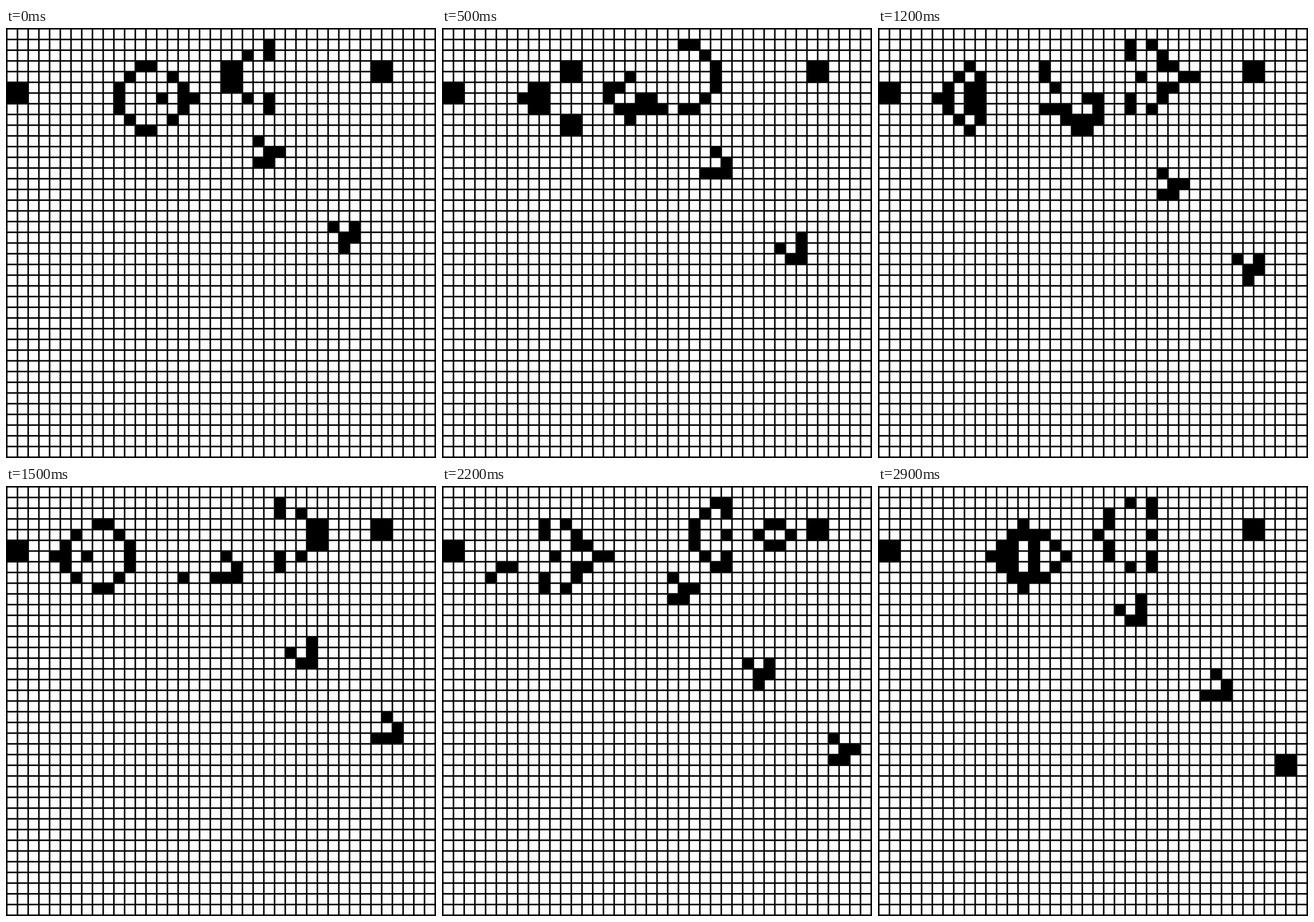
An HTML page with a canvas that plays this animation: 748 by 748 pixels, repeating every 3 s.

```html
<!DOCTYPE html>
<html lang="en">
<head>
<meta charset="utf-8">
<title>Glider gun</title>
<style>
  html, body { margin: 0; height: 100%; overflow: hidden; background: #000; }
  canvas { display: block; }
</style>
</head>
<body>
<canvas id="stage" width="748" height="748"></canvas>
<script>
const ctx = document.getElementById('stage').getContext('2d');
const SIZE = 40;
const PITCH = 7, LINE = 1; // in grid units, scaled to fill the stage
const EXTENT = SIZE * PITCH + LINE;
const STEP_MS = 100, PERIOD = 30;
const LIVE_COLS = 39; // cells beyond this column never come alive

const makeGrid = rule => Array.from({ length: SIZE }, (_, y) =>
  Array.from({ length: SIZE }, (_, x) => rule(x, y)));

// The gun: two still blocks and two shuttles, each symmetric about a row
function gun() {
  const grid = makeGrid(() => false);
  const block = (x, y) => {
    for (const dy of [0, 1]) grid[y + dy].fill(true, x, x + 2);
  };
  const mirrored = (axis, columns) => columns.forEach((xs, distance) => {
    for (const x of xs) grid[axis - distance][x] = grid[axis + distance][x] = true;
  });
  block(0, 5);
  block(34, 3);
  mirrored(6, [[10, 14, 16, 17], [10, 16], [11, 15], [12, 13]]);
  mirrored(4, [[20, 21], [20, 21], [22, 24], [24]]);
  return grid;
}

function evolve(grid) {
  const alive = (x, y) => grid[y]?.[x] ? 1 : 0;
  return makeGrid((x, y) => {
    if (x >= LIVE_COLS) return false;
    let neighbours = -alive(x, y);
    for (let dy = -1; dy <= 1; dy++)
      for (let dx = -1; dx <= 1; dx++) neighbours += alive(x + dx, y + dy);
    return neighbours === 3 || (neighbours === 2 && grid[y][x]);
  });
}

// Two periods of warm-up put two gliders in flight; the third is shown
const history = [gun()];
while (history.length < 3 * PERIOD) history.push(evolve(history.at(-1)));
const loop = history.slice(-PERIOD);

ctx.scale(748 / EXTENT, 748 / EXTENT);

function draw(grid) {
  ctx.fillStyle = '#000';
  ctx.fillRect(0, 0, EXTENT, EXTENT);
  ctx.fillStyle = '#fff';
  const side = PITCH - LINE;
  grid.forEach((row, y) => row.forEach((live, x) => {
    if (!live) ctx.fillRect(x * PITCH + LINE, y * PITCH + LINE, side, side);
  }));
}

const start = performance.now();
let shown = -1;
function tick() {
  const generation = Math.floor((performance.now() - start) / STEP_MS) % PERIOD;
  if (generation !== shown) draw(loop[shown = generation]);
  requestAnimationFrame(tick);
}
tick();
</script>
</body>
</html>
```
